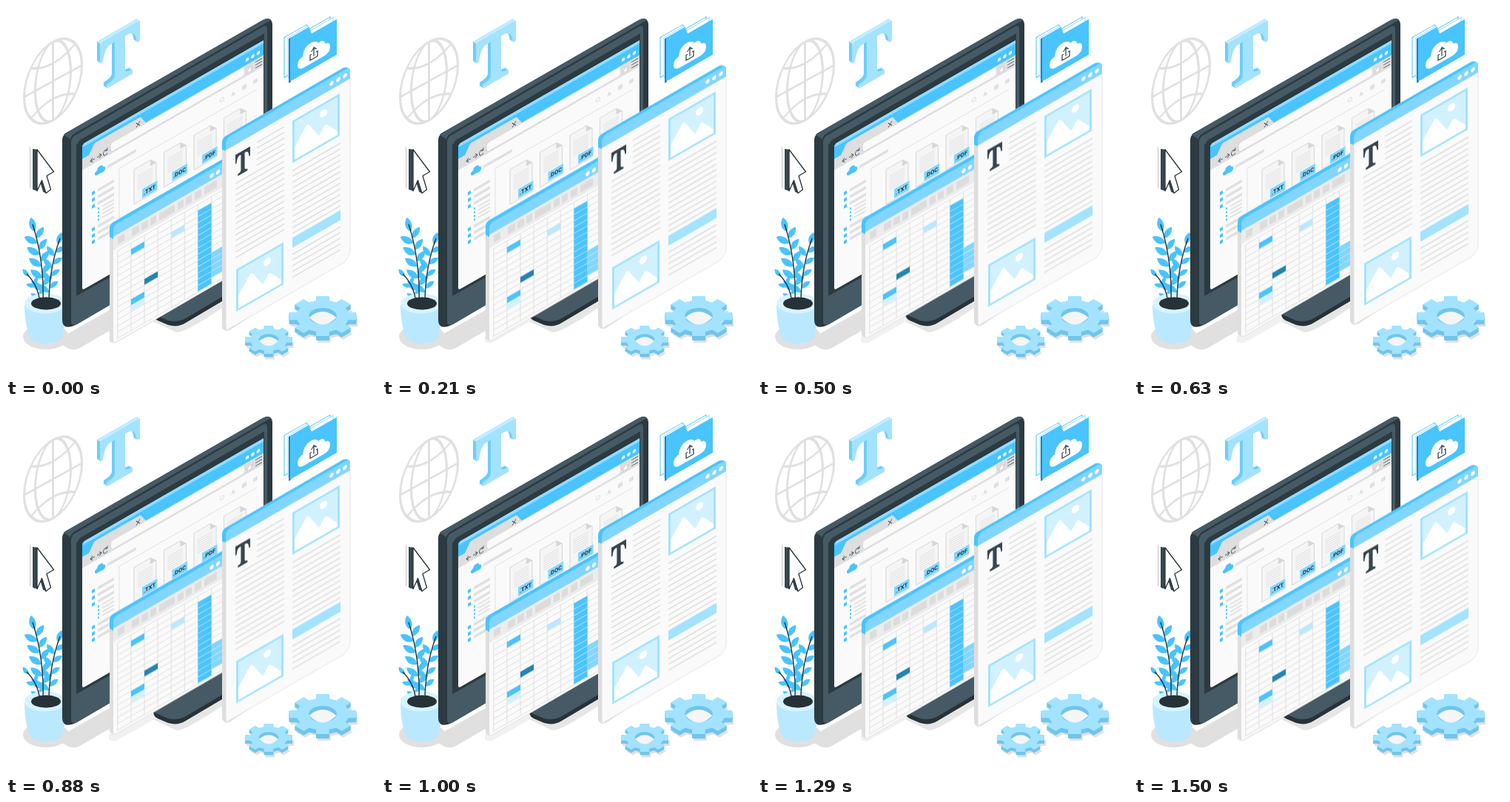
An HTML page that plays this animation: 500 px wide and 500 px high, repeating every 1540 ms.

```html
<!DOCTYPE html>
<html lang="en">
<head>
<meta charset="utf-8">
<title>Floating windows</title>
<style>
  html, body { margin: 0; width: 100%; height: 100%; overflow: hidden; background: #fff; }
  svg { display: block; width: 100vw; height: 100vh; }
  .float { animation: float 1540ms linear infinite; }
  @keyframes float { 50% { transform: translateY(-10px); } }
  .tag { font: bold 7.5px Roboto, Arial, sans-serif; fill: #263238; text-anchor: middle; }
  .line { fill: none; stroke: #e0e0e0; }
</style>
</head>
<body>
<svg viewBox="0 0 500 500">
  <defs>
    <path id="bigT" d="M0 0H54V27H50Q48 12 42 10Q40 9 34 9V54Q34 60 44 60V66H9V60Q20 60 20 54V9Q13 9 11 10Q6 12 4 27H0Z"/>
    <path id="arrow" d="M42 194L64.500 224L55 229.500L60.500 248L54 253L48.500 235.500L42 250Z"/>
    <g id="picture">
      <rect x="1.500" y="1.500" width="61" height="54" fill="#d2f1ff" stroke="#a3e3ff" stroke-width="3"/>
      <circle cx="42" cy="14" r="5" fill="#fff"/>
      <path d="M3 54V37L19 17Q21 16 23 19L36 41L43 32Q45 30 47 32L61 49V54Z" fill="#fff"/>
    </g>
    <g id="file">
      <path d="M0 0H22L30 8V47H0Z" fill="#f5f5f5" stroke="#dcdcdc" stroke-width="1.200"/>
      <path d="M22 0V8H30Z" fill="#d6d6d6"/>
      <path d="M5 12H25M5 15H25M5 18H25M5 21H25M5 24H25M5 27H25M5 30H25" class="line"/>
    </g>
  </defs>

  <!-- floor shadows -->
  <g fill="#e0e0e0">
    <ellipse cx="54" cy="447" rx="31" ry="17"/>
    <path d="M62 455L145 408V436L98 463Q88 467 78 459Z"/>
    <path d="M194 424L230 441Q240 443 292 408V390Z" fill="#e6e6e6"/>
    <path d="M139 447V453Q144 458 151 454L292 374V366Z" fill="#f1f1f1"/>
  </g>

  <!-- globe -->
  <g transform="matrix(1 -.55 0 1 63.500 101.500)" class="line" stroke-width="3">
    <ellipse rx="39" ry="53"/>
    <ellipse rx="24" ry="53"/>
    <path d="M0 -53V53M-39 0H39M-30 -34Q0 -14 30 -34M-30 34Q0 14 30 34"/>
  </g>

  <!-- letter -->
  <g transform="matrix(1 -.577 0 1 127 51)">
    <use href="#bigT" x="-4" y="-5" fill="#6fcdf9"/>
    <use href="#bigT" x="-2" y="-2.500" fill="#6fcdf9"/>
    <path d="M-4 -5H50L54 0H0Z" fill="#c2ecff"/>
    <use href="#bigT" fill="#a3e3ff"/>
  </g>

  <!-- folder -->
  <g transform="matrix(1 -.577 0 1 384 56)">
    <path d="M-8 -18H22L26 -10H54V36H-8Z" fill="#fff" stroke="#49c4ff"/>
    <path d="M-3 -15H24L28 -7H58V40H-3Z" fill="#fff" stroke="#92dcff"/>
    <path d="M-2 -13H1V47H-2Z" fill="#2484b3"/>
    <path d="M0 -13H25L29 -2H63V46H0Z" fill="#49c4ff"/>
    <g transform="translate(0 -3)">
      <path d="M18 41Q10 40 10 33Q10 26 17 25Q18 13 28 13Q35 13 38 19Q46 17 47 25Q54 26 54 33Q54 41 46 41Z" fill="#fff"/>
      <path d="M32 33V22M28.500 25.500L32 21.500L35.500 25.500M29 29H27V36H37V29H35" fill="none" stroke="#37474f" stroke-width="1.300"/>
    </g>
  </g>

  <!-- plant -->
  <g id="leaves"></g>
  <path d="M25 402Q25 432 33 449Q38 456 54 456Q70 456 75 449Q81 432 81 402Z" fill="#b9e8ff"/>
  <ellipse cx="53" cy="402" rx="28" ry="13.500" fill="#d8f3ff"/>
  <ellipse cx="54" cy="402" rx="20" ry="8.500" fill="#263238"/>
  <g id="stems" fill="none" stroke="#263238" stroke-width="1.400"></g>

  <!-- monitor -->
  <path d="M200 412L292 361V399L243 428Q232 435 219 431L205 425Q197 421 200 412Z" fill="#263238"/>
  <path d="M200 411L292 359V393L243 422Q232 428 219 425L205 419Q198 416 200 411Z" fill="#455a64"/>
  <path d="M76 181Q76 175 82 171L347 19Q359 13 360 25V276L96 430Q76 440 76 424Z" fill="#2c3a41"/>
  <path d="M78 174Q79 172 82 171L347 19Q354 15 358 19L93 172Q88 175 87 180Z" fill="#455a64"/>
  <path d="M88 184Q88 178 93 175L347 28Q353 25 353 31V278L96 430Q88 433 88 426Z" fill="#455a64"/>
  <path d="M95 188L100 181L349 37V250L95 392Z" fill="#2c3a41"/>

  <!-- browser -->
  <g transform="matrix(1 -.573 0 1 103 187)">
    <path d="M0 3Q0 0 3 0H245V197H4Q0 197 0 194Z" fill="#fafafa"/>
    <path d="M0 20V3Q0 0 3 0H245V20Z" fill="#49c4ff"/>
    <path d="M1 5Q1 0 5 0H245V4H1Z" fill="#92dcff"/>
    <path d="M0 35V20H9L15 10Q16 8 19 8H77Q79 8 80 10L86 20H245V35Z" fill="#dedede"/>
    <rect x="39" y="21" width="180" height="11" rx="3" fill="#fafafa"/>
    <g fill="#fff"><circle cx="223" cy="13" r="2.300"/><circle cx="230.500" cy="13" r="2.300"/><circle cx="238" cy="13" r="2.300"/></g>
    <path d="M73 13L78 19M78 13L73 19M11 29H17M14 26L11 29L14 32M20 29H26M23 26L26 29L23 32M34 27A3 3.500 0 1 0 34 31M34 24V27H31M234 23H243M234 27H243M234 31H243" fill="none" stroke="#455a64" stroke-width=".9"/>
    <path d="M226 23L227.500 27H231L228 29L229 33L226 31L223 33L224 29L221 27H225Z" fill="#fafafa" stroke="#cfcfcf" stroke-width=".7"/>
    <path d="M19 53Q17 52 17 49Q18 47 20 47Q21 42 25 43Q28 43 28 46Q32 47 31 51Q31 53 29 53Z" fill="#49c4ff"/>
    <path d="M34 50H73" class="line" stroke-width="4"/>
    <path d="M50 61V183M50 61H236" class="line"/>
    <g fill="#e0e0e0">
      <circle cx="189" cy="48" r="2.500" fill="none" stroke="#e0e0e0"/>
      <path d="M201 51L204 45L207 51Z"/><rect x="216" y="45" width="6" height="6"/><rect x="231" y="46" width="6" height="5"/>
    </g>
    <g id="side"></g>
    <g id="files"></g>
  </g>

  <!-- spreadsheet -->
  <g class="float">
    <path d="M140 301Q140 295 145 292L310 197V361L152 453Q147 457 143 454Q140 453 140 449Z" fill="#dedede"/>
    <path d="M140 312V301Q140 295 145 292L310 197V225L145 315Z" fill="#49c4ff"/>
    <g transform="matrix(1 -.577 0 1 145 299)">
      <path d="M0 13H160V157H4Q0 157 0 153Z" fill="#fafafa"/>
      <path d="M0 13V5Q0 -2 5 -2H160V13Z" fill="#81d6ff"/>
      <rect y="13" width="160" height="18" fill="#ececec"/>
      <g fill="#fff"><circle cx="133" cy="7" r="2.800"/><circle cx="141.500" cy="7" r="2.800"/></g>
      <g id="sheet"></g>
    </g>
  </g>

  <!-- document -->
  <g class="float">
    <path d="M292 185Q292 178 298 175L455 84Q461 81 465 86V330L304 437Q298 441 294 437Q292 436 292 432Z" fill="#dedede"/>
    <path d="M292 194V185Q292 178 298 175L455 84Q461 81 465 86V97L297 196Z" fill="#49c4ff"/>
    <g transform="matrix(1 -.577 0 1 297 181.700)">
      <path d="M0 13H168V246Q168 253 160 257H5Q0 259 0 253Z" fill="#fafafa" stroke="#dedede" stroke-width=".8"/>
      <path d="M0 13V5Q0 -2.500 7 -2.500H162Q168 -2.500 168 3V13Z" fill="#81d6ff"/>
      <g fill="#fff"><circle cx="143" cy="5.500" r="2.800"/><circle cx="152" cy="5.500" r="2.800"/><circle cx="161" cy="5.500" r="2.800"/></g>
      <use href="#bigT" transform="translate(13 27) scale(.37 .46)" fill="#37474f"/>
      <g id="text"></g>
      <rect x="90" y="183.500" width="65" height="13.500" fill="#a3e3ff"/>
      <use href="#picture" x="90" y="25.500"/>
      <use href="#picture" x="14" y="182.500"/>
    </g>
  </g>

  <g id="gears"></g>

  <!-- pointer -->
  <path d="M31.500 189L34 192V247L31.500 245Z" fill="#e0e0e0"/>
  <path d="M36 193L42 194V250L36 248ZM45 234L48.500 235.500L54 253L50 251Z" fill="#37474f"/>
  <use href="#arrow" fill="#fff" stroke="#263238" stroke-width="1.300" stroke-linejoin="round"/>
</svg>
<script type="module">
  const NS = 'http://www.w3.org/2000/svg';
  const add = (id, tag, attrs, text = '') => {
    const el = document.createElementNS(NS, tag);
    for (const k in attrs) el.setAttribute(k, attrs[k]);
    el.textContent = text;
    document.getElementById(id).append(el);
  };
  const rect = (id, x, y, width, height, fill) => add(id, 'rect', { x, y, width, height, fill });
  const path = (id, d, fill, more = {}) => add(id, 'path', { d, fill, ...more });

  // Evenly spaced rules of text
  const rules = (x1, x2, y, count) => {
    let d = '';
    for (let i = 0; i < count; i++) d += `M${x1} ${y + i * 7.7}H${x2}`;
    path('text', d, 'none', { class: 'line', 'stroke-width': 1.8 });
  };
  rules(42, 79, 27, 5);
  rules(13, 79, 66, 14);
  rules(90, 155, 93, 12);
  rules(90, 155, 206, 5);

  // Browser sidebar and files
  for (const y of [72, 81, 90, 121, 129.5, 138]) {
    rect('side', 13, y, 4, 4.5, '#49c4ff');
    rect('side', 21, y, 22, 4, '#e0e0e0');
  }
  for (let i = 0; i < 4; i++) {
    rect('side', 21, 98 + i * 5, 2, 2.5, '#49c4ff');
    rect('side', 27, 98 + i * 5, 16, 2.5, '#e4e4e4');
  }
  ['.TXT', '.DOC', '.PDF', ''].forEach((name, i) => {
    const x = 70 + i * 40.5;
    add('files', 'use', { href: '#file', x, y: 74 });
    if (!name) return;
    rect('files', x + 11, 107, 20.5, 12.5, '#81d6ff');
    add('files', 'text', { x: x + 21, y: 116, class: 'tag' }, name);
  });

  // Spreadsheet: tools, grid, filled cells
  const rowH = 8.45, colW = 18.1, gridX = 5.8, gridY = 43.6;
  for (const [x, w] of [[6, 9], [25, 10], [38, 9], [50, 8], [62, 21], [87, 8], [98, 8], [110, 9], [123, 17]]) {
    rect('sheet', x, 17, w, 10, '#dcdcdc');
  }
  let grid = '';
  for (let r = -1; r <= 13; r++) grid += `M5 ${gridY + r * rowH}H160`;
  for (let c = 0; c < 9; c++) grid += `M${gridX + c * colW} ${gridY - rowH}V${gridY + 13 * rowH}`;
  path('sheet', grid, 'none', { class: 'line' });
  const cell = (c, r, fill) => rect('sheet', gridX + c * colW, gridY + r * rowH, colW, rowH - .7, fill);
  cell(1, 0, '#49c4ff');
  cell(4, 1, '#b9e8ff');
  cell(2, 6, '#2484b3');
  cell(1, 8, '#49c4ff');
  cell(1, 9, '#d2f1ff');
  for (let r = 0; r < 13; r++) cell(6, r, '#49c4ff');
  for (let r = 8; r < 12; r++) cell(7, r, '#81d6ff');

  // Gears lying on the floor
  const gear = (cx, cy, R) => {
    const outline = dy => {
      const pts = [];
      for (let i = 0; i < 8; i++) {
        for (const [a, k] of [[-.25, .78], [-.19, 1], [.19, 1], [.25, .78]]) {
          const t = i * Math.PI / 4 + a;
          pts.push(`${(cx + R * k * Math.cos(t)).toFixed(1)} ${(cy + dy + R * k * .6 * Math.sin(t)).toFixed(1)}`);
        }
      }
      return `M${pts.join('L')}Z`;
    };
    const depth = R * .13;
    path('gears', outline(depth + 3), '#e0e0e0', { transform: 'translate(2 0)' });
    for (let dy = depth; dy > 0; dy--) path('gears', outline(dy), '#6fc5ec');
    path('gears', outline(0), '#a3e3ff');
    add('gears', 'ellipse', { cx, cy, rx: R * .41, ry: R * .24, fill: '#6fc5ec' });
    const x1 = cx - R * .4, x2 = cx + R * .4, y = cy + 2;
    path('gears', `M${x1} ${y}Q${cx} ${cy - R * .3} ${x2} ${y}Q${cx} ${cy + R * .46} ${x1} ${y}Z`, '#f5f5f5');
  };
  gear(428, 419, 46);
  gear(355, 451, 32.5);

  // Plant: leaves in pairs along curved stems
  const stem = (p, c, q, pairs, size) => {
    path('stems', `M${p}Q${c} ${q}`, 'none');
    const at = (t, i) => (1 - t) ** 2 * p[i] + 2 * t * (1 - t) * c[i] + t * t * q[i];
    const leaf = (t, turn, len) => {
      const dx = at(t + .01, 0) - at(t - .01, 0), dy = at(t + .01, 1) - at(t - .01, 1);
      const deg = Math.atan2(dy, dx) * 180 / Math.PI + turn;
      path('leaves', `M0 0C${len * .3} ${-len * .36} ${len * .7} ${-len * .3} ${len} 0C${len * .7} ${len * .26} ${len * .3} ${len * .26} 0 0Z`,
        '#49c4ff', { transform: `translate(${at(t, 0)} ${at(t, 1)}) rotate(${deg})` });
    };
    for (let i = 0; i < pairs; i++) {
      const t = .16 + .74 * i / pairs;
      leaf(t, -52, size);
      leaf(t + .06, 46, size * .9);
    }
    leaf(.9, 0, size);
  };
  stem([50, 402], [52, 345], [36, 295], 5, 20);
  stem([58, 402], [58, 355], [73, 314], 4, 17);
  stem([46, 402], [44, 378], [28, 362], 2, 13);
</script>
</body>
</html>
```
